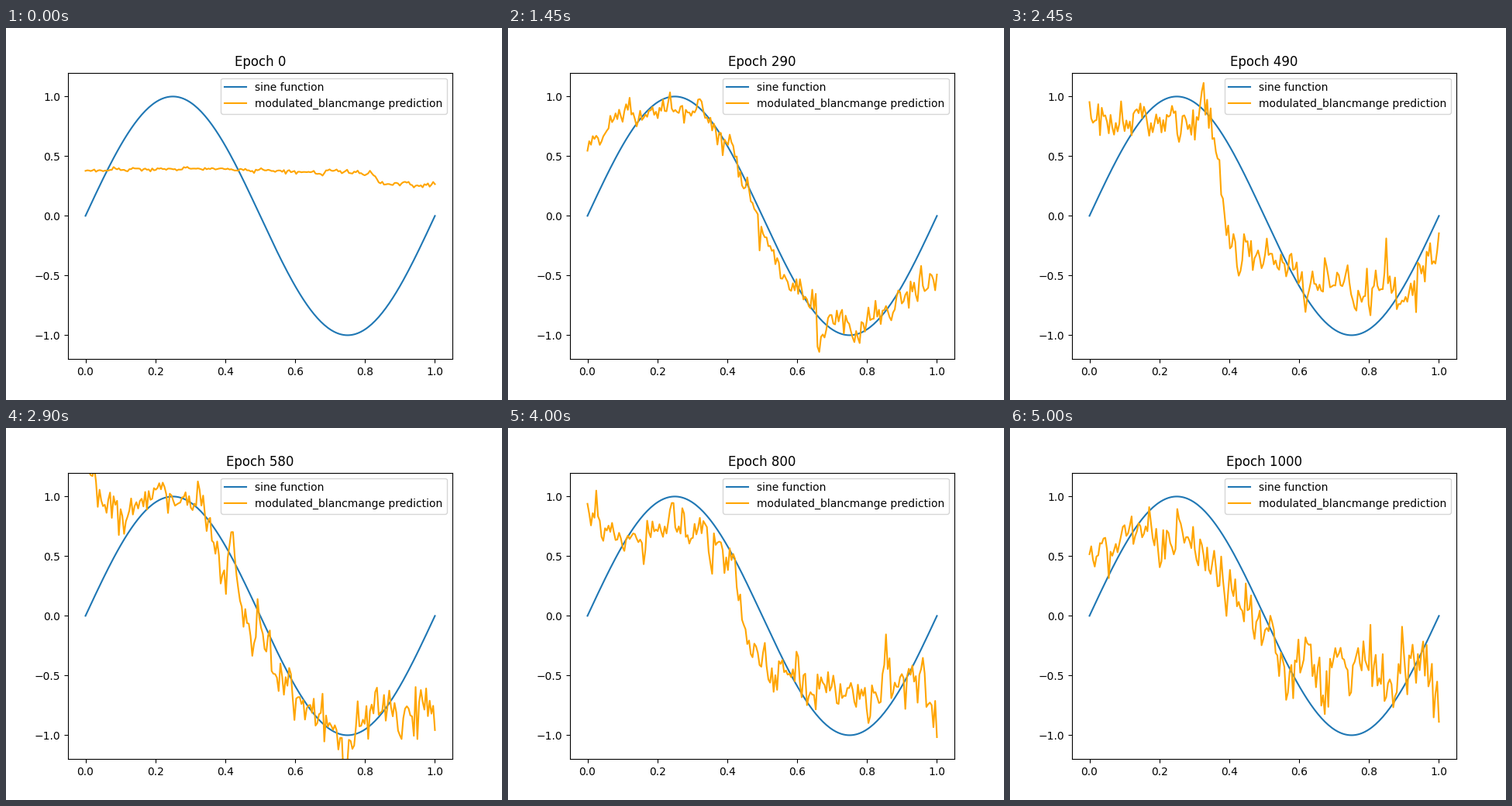
Recreate the animation shown at these times as a matplotlib script. Size 640 by 480 pixels, loop 5.05 s.

```python
import numpy as np
import matplotlib.pyplot as plt
from matplotlib.animation import FuncAnimation

FRAMES, INTERVAL = 101, 50
EPOCHS_PER_FRAME = 10
HOLD = 4                       # frames between two noise states
BURSTS = (39, 45, 59)          # frames where a spike pushes the legend aside

x = np.linspace(0, 1, 200)
sine = np.sin(2 * np.pi * x)
rng = np.random.default_rng(7)


def trend(high, low, drop, width, swell, head, tail):
    """Plateau falling to a lower one, with a sine swell and bent ends."""
    fall = (1 + np.tanh((drop - x) / width)) / 2
    ends = head * np.exp(-x / .04) + tail * np.exp((x - 1) / .04)
    return low + (high - low) * fall + swell * sine + ends


# (frame, roughness, trend) at the main stages of the training
stages = [
    (0, .010, trend(.38, .275, .83, .01, .015, 0, 0)),
    (14, .07, trend(.75, -.80, .48, .20, 0, .1, .3)),
    (29, .08, trend(.65, -.60, .48, .12, .3, -.1, .2)),
    (49, .12, trend(.60, -.40, .375, .02, .2, .4, .1)),
    (67, .13, trend(.65, -.75, .52, .10, .15, .6, -.3)),
    (80, .12, trend(.60, -.45, .44, .04, .12, .25, -.6)),
    (100, .17, trend(.60, -.40, .42, .10, .1, 0, -.3)),
]


def rough_field():
    """Random steps on dyadic cells plus fine jitter, unit variance."""
    field = rng.laplace(0, .45, len(x))
    for cells in (16, 32, 64, 128):
        steps = rng.normal(0, .39, cells + 1)
        field += steps[(x * cells).astype(int)]
    return field


fields = [rough_field() for _ in range(FRAMES // HOLD + 2)]


def noise(i):
    k, step = divmod(i, HOLD)
    a = step / HOLD * np.pi / 2
    blend = np.cos(a) * fields[k] + np.sin(a) * fields[k + 1]
    return blend * (.7 + .6 * x)


def prediction(i):
    k = min(sum(frame <= i for frame, _, _ in stages), len(stages) - 1)
    (f0, rough0, y0), (f1, rough1, y1) = stages[k - 1:k + 1]
    s = (i - f0) / (f1 - f0)
    mix = 1 - (1 - s) ** 2 if k == 1 else s
    y = (y0 + mix * (y1 - y0)) * (1 + .2 * np.sin(np.pi * s))
    y += (rough0 + mix * (rough1 - rough0)) * noise(i)
    pull = sum(np.exp(-((i - c) / 1.5) ** 2) for c in BURSTS)
    return y + pull * (1.05 - y) * np.exp(-((x - .42) / .012) ** 2)


fig, ax = plt.subplots(figsize=(6.4, 4.8), dpi=100)
ax.plot(x, sine, label="sine function")
line, = ax.plot(x, prediction(0), color="orange",
                label="modulated_blancmange prediction")
ax.set_ylim(-1.2, 1.2)
ax.legend(loc="best")
title = ax.set_title("Epoch 0")


def update(i):
    line.set_ydata(prediction(i))
    title.set_text(f"Epoch {i * EPOCHS_PER_FRAME}")
    return line, title


anim = FuncAnimation(fig, update, frames=FRAMES, interval=INTERVAL,
                     repeat=True, repeat_delay=0)
plt.show()
```
